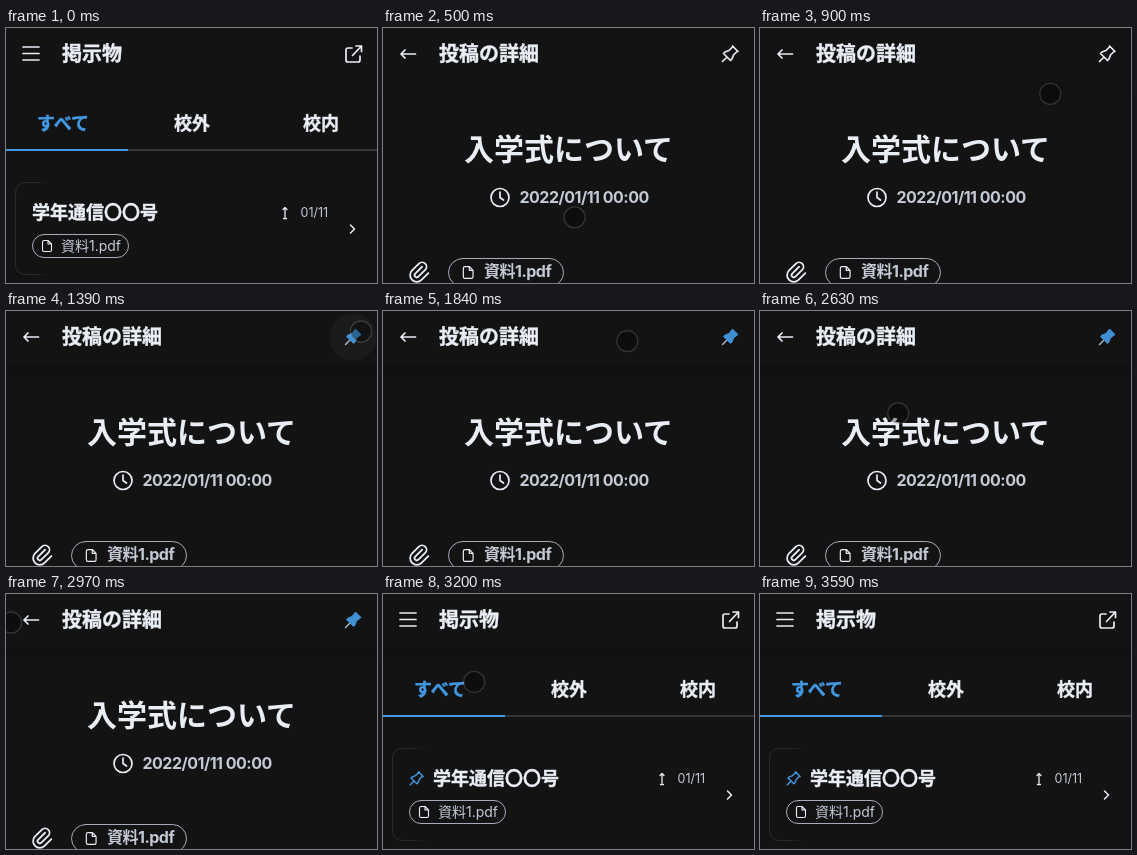
Animation, 371 px wide and 255 px high, one loop 3.72 s. Source, as an HTML page:

```html
<!DOCTYPE html>
<html lang="ja">
<meta charset="utf-8">
<title>掲示物</title>
<style>
  html, body { margin: 0; width: 100%; height: 100%; overflow: hidden; background: #131314; }
  svg { display: block; width: 371px; height: 255px; }
  text { font-family: Inter, "Noto Sans CJK JP", "Noto Sans CJK", sans-serif; fill: #e9eef5; }
  .bold { font-weight: 700; }
  .heavy { font-weight: 700; stroke: #e9eef5; stroke-width: .4; }
  .tight { font-weight: 700; letter-spacing: -.5px; }
  .line { fill: none; stroke: #e9eef5; stroke-width: 1.7; stroke-linecap: round; stroke-linejoin: round; }
  .soft { stroke: #a5adba; stroke-width: 1; }
  .blue { stroke: #4299e1; }
  text.blue { fill: #4299e1; }
  text.dim { fill: #c3cad5; }
</style>
<svg viewBox="0 0 371 255">
  <defs>
    <linearGradient id="shade" x2="0" y2="1">
      <stop stop-color="#101011"/><stop offset="1" stop-color="#131314"/>
    </linearGradient>
    <linearGradient id="edge" gradientUnits="userSpaceOnUse" x1="9" x2="42">
      <stop stop-color="#292a2c"/><stop offset=".6" stop-color="#292a2c"/><stop offset="1" stop-color="#131314"/>
    </linearGradient>
    <path id="pin" d="M15 4.5l-4 4-4 1.5-1.5 1.5 7 7L14 17l1.5-4 4-4M9 15l-4.5 4.5M14.5 4L20 9.5"/>
    <path id="file" d="M6 .5H2Q.5 .5 .5 2V10Q.5 11.5 2 11.5H8Q9.5 11.5 9.5 10V4zV4H9.5"/>
  </defs>
  <rect width="371" height="255" fill="#131314"/>
  <rect y="54" width="371" height="26" fill="url(#shade)"/>

  <g id="list">
    <path class="line" d="M17 19H33M17 25.5H33M17 32H33"/>
    <text class="heavy" x="56" y="33" font-size="20">掲示物</text>
    <path class="line" d="M346 20H342Q340 20 340 22V32Q340 34 342 34H352Q354 34 354 32V28M346.5 27.5L355.5 18M350 18H355.5V23.5"/>
    <g font-size="18" text-anchor="middle">
      <text class="heavy blue" x="57" y="102">すべて</text>
      <text class="heavy" x="186" y="102">校外</text>
      <text class="heavy" x="315" y="102">校内</text>
    </g>
    <path d="M122 122H371" stroke="#343537" stroke-width="2"/>
    <path d="M0 122H122" stroke="#4299e1" stroke-width="2"/>
    <path d="M42 154.5H20Q9.5 154.5 9.5 165V236Q9.5 246.5 20 246.5H42" fill="none" stroke="url(#edge)"/>
    <use id="smallPin" href="#pin" class="line blue" transform="translate(23.5 174.5) scale(.83)"/>
    <text id="post" class="heavy" x="26" y="191" font-size="18">学年通信〇〇号</text>
    <rect class="line soft" x="26.5" y="206.5" width="96" height="23" rx="11.5"/>
    <use href="#file" class="line" style="stroke-width:1.1" x="36" y="212"/>
    <text class="dim" x="55" y="222.5" font-size="14">資料1.pdf</text>
    <path class="line" style="stroke-width:1.3" d="M279 181V189M277 181.5L279 179.5L281 181.5M277.5 190.5H280.5"/>
    <text class="dim" x="294.5" y="189" font-size="12.5">01/11</text>
    <path class="line" style="stroke-width:1.5" d="M344.5 197L348.5 201L344.5 205"/>
  </g>

  <g id="detail">
    <path class="line" d="M32.5 26H18M22 22L18 26L22 30"/>
    <text class="heavy" x="56" y="33" font-size="20">投稿の詳細</text>
    <circle id="press" cx="347" cy="26" r="23.5" fill="#1b1b1c"/>
    <g transform="translate(335 14)">
      <use id="openPin" href="#pin" class="line"/>
      <g id="bluePin">
        <path d="M9.5 14.5L4.5 19.5" stroke="#a8b3c0" stroke-width="1.5" stroke-linecap="round"/>
        <path d="M14.5 4L20 9.5 15.5 13 14 17l-1.5 1.5-7-7L7 10l4-1.5z" fill="#3f8fd2" stroke="#3f8fd2" stroke-linejoin="round"/>
      </g>
    </g>
    <text class="bold" x="185.5" y="132" font-size="30" text-anchor="middle">入学式について</text>
    <g class="line"><circle cx="117" cy="169.5" r="9"/><path d="M117 164V169.5L120.5 172"/></g>
    <text class="dim tight" x="136.5" y="175" font-size="16">2022/01/11 00:00</text>
    <path class="line" transform="translate(23.3 231.4) scale(1.05)"
      d="M15 7l-6.5 6.5a1.5 1.5 0 0 0 3 3l6.5-6.5a3 3 0 0 0-6-6l-6.500 6.5a4.5 4.5 0 0 0 9 9l6.500-6.500"/>
    <rect class="line soft" x="65.5" y="230.5" width="115" height="28" rx="14"/>
    <use href="#file" class="line" style="stroke-width:1.1" transform="translate(79.8 238) scale(1.08)"/>
    <text class="dim tight" x="101" y="249" font-size="16">資料1.pdf</text>
  </g>

  <circle id="cursor" r="10.5" fill="#000" fill-opacity=".3" stroke="#fff" stroke-opacity=".15" stroke-width="1.3"/>
</svg>
<script>
  const LOOP = 3720, OPEN = 400, PIN = 1270, BACK = 3080;
  const $ = id => document.getElementById(id);
  const show = (id, on) => $(id).style.display = on ? '' : 'none';
  const clamp = v => Math.max(0, Math.min(1, v));

  // Cursor route: time, x, y
  const route = [
    [0, 150, 270], [130, 150, 270], [330, 181, 207], [500, 191.5, 189.5], [660, 212, 142],
    [900, 290, 66], [1180, 355, 20.5], [1420, 355, 20.5], [1720, 283, 25], [1840, 244.5, 30],
    [1950, 232, 62], [2110, 262, 160], [2290, 307.5, 248], [2400, 329, 235], [2600, 165, 118],
    [2800, 14, 36], [2970, 5, 28.5], [3080, 18, 29], [3220, 105, 100], [3390, 240, 225],
    [3500, 275, 260], [3590, 282, 270], [LOOP, 282, 270]
  ];

  const slope = (i, k) => route[i] && route[i + 1]
    ? (route[i + 1][k] - route[i][k]) / (route[i + 1][0] - route[i][0]) : 0;
  const tangent = (i, k) => {
    const a = slope(i - 1, k), b = slope(i, k);
    return a * b > 0 ? 2 * a * b / (a + b) : 0;
  };

  // Monotone cubic interpolation, so rests stay still
  function along(i, t, k) {
    const [p, q] = [route[i], route[i + 1]], span = q[0] - p[0], u = (t - p[0]) / span;
    return p[k] + (q[k] - p[k]) * u * u * (3 - 2 * u)
      + span * u * (1 - u) * ((1 - u) * tangent(i, k) - u * tangent(i + 1, k));
  }

  function draw(now) {
    const t = now % LOOP, detail = t >= OPEN && t < BACK, pinned = t >= PIN;
    show('list', !detail);
    show('detail', detail);
    show('openPin', !pinned);
    show('bluePin', pinned);
    show('smallPin', pinned);
    $('post').setAttribute('x', pinned ? 50 : 26);
    $('press').style.opacity = Math.min(clamp((t - 1210) / 100), clamp((1640 - t) / 180));
    const i = route.findIndex((p, n) => n + 1 < route.length && t < route[n + 1][0]);
    $('cursor').setAttribute('transform', `translate(${along(i, t, 1)} ${along(i, t, 2)})`);
  }

  const start = performance.now();
  (function tick() {
    draw(performance.now() - start);
    requestAnimationFrame(tick);
  })();
</script>
</html>
```
